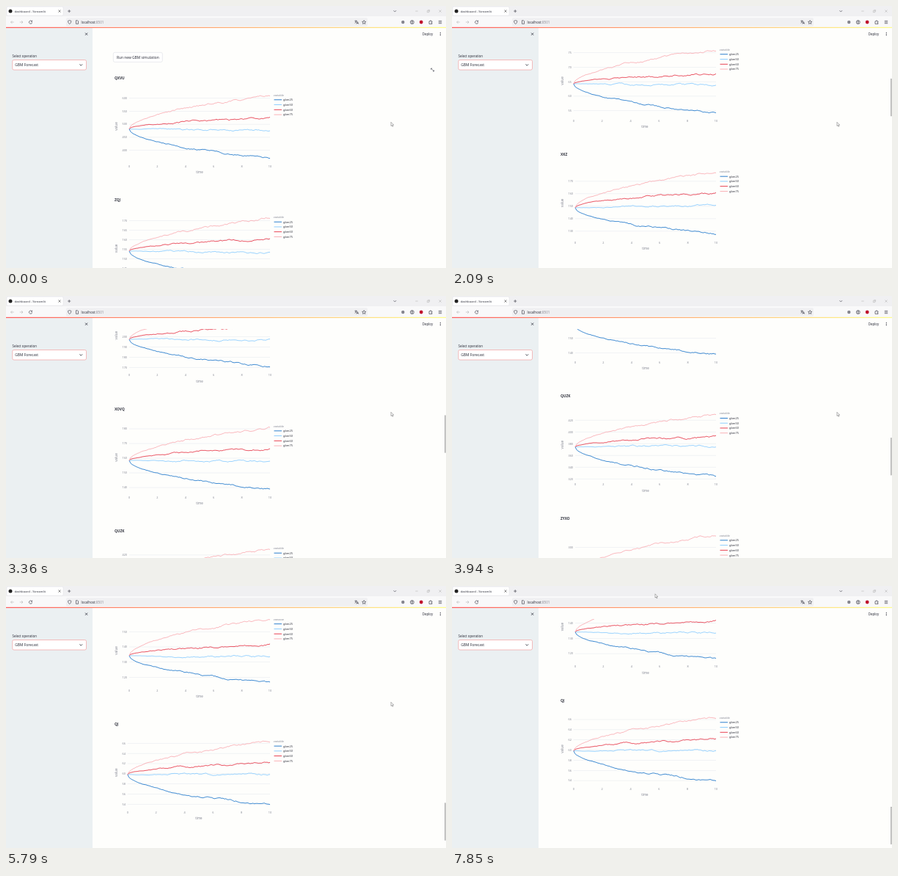
Recreate the animation shown at these times as an HTML page with a canvas. Size 600 px wide and 357 px high, loop 7.91 s.

```html
<!DOCTYPE html>
<html lang="en">
<head>
<meta charset="utf-8">
<title>dashboard</title>
<style>
html, body { margin: 0; width: 100%; height: 100%; overflow: hidden; background: #fff; }
canvas { display: block; width: 600px; height: 357px; }
</style>
</head>
<body>
<canvas id="stage"></canvas>
<script>
const W = 600, H = 357, LOOP = 7910;
const PITCH = 166.4, FIRST_TITLE = 98, PLOT_RIGHT = 360;
const FONT = '"Noto Sans", "Open Sans", sans-serif';
const INK = '#31333f', MUTED = '#858894';

// exponent: how quickly each quantile leaves the starting price
const SERIES = [
  { name: 'gbm25', color: '#1672c9', exponent: 0.51, noise: 0.8 },
  { name: 'gbm50', color: '#83c9ff', exponent: 1, noise: 0.85 },
  { name: 'gbm60', color: '#e62f42', exponent: 0.5, noise: 0.9 },
  { name: 'gbm75', color: '#f9a9b0', exponent: 0.54, noise: 1 },
];

// ticks: top value, value step, top y, y step, count; y values are relative to the title
const CHARTS = [
  { name: 'QXVU', ticks: [600, 50, 27.5, 17.8, 5], start: 69.5, ends: [109.5, 72, 53.5, 24.5] },
  { name: 'ZQJ', ticks: [170, 5, 28.3, 12.9, 7], start: 69.5, ends: [109.5, 71, 52.5, 25] },
  { name: 'VUQY', ticks: [75, 5, 27.7, 19.75, 5], start: 70, ends: [109.5, 72, 56.5, 25.5] },
  { name: 'XKZ', ticks: [170, 10, 36.5, 17, 5], start: 72.5, ends: [109, 69, 52, 25] },
  { name: 'ZEQO', ticks: [230, 10, 26, 13.95, 7], start: 71.5, ends: [109, 71, 54, 26.5] },
  { name: 'XOVQ', ticks: [180, 10, 27, 20, 5], start: 70, ends: [109, 71, 54, 25] },
  { name: 'QUZK', ticks: [420, 20, 32.5, 16, 6], start: 69, ends: [109, 69, 53.5, 25] },
  { name: 'ZYXO', ticks: [300, 50, 39.7, 28.7, 3], start: 74.5, ends: [109.4, 72.4, 57.4, 24] },
  { name: 'JXQ', ticks: [30, 1, 26.5, 13, 7], start: 69, ends: [108.5, 68, 51, 25] },
  { name: 'VEZX', ticks: [150, 10, 40.4, 20.7, 4], start: 73, ends: [109, 74.5, 57, 24] },
  { name: 'QJ', ticks: [66, 2, 26, 13.85, 7], start: 68.5, ends: [109.5, 68.5, 52, 24.5] },
];

const SCROLL = [[1000, 0], [1360, 185.4], [2790, 595.1], [3940, 959.4],
  [4790, 1258.7], [5790, 1573.5], [5950, 1606]];

const canvas = document.getElementById('stage');
const dpr = window.devicePixelRatio || 1;
canvas.width = W * dpr;
canvas.height = H * dpr;
const ctx = canvas.getContext('2d');
ctx.scale(dpr, dpr);

function random(seed) {
  return () => {
    seed = (seed * 1664525 + 1013904223) >>> 0;
    return seed / 4294967296;
  };
}

function quantilePath(left, start, end, { exponent, noise }, seed) {
  const next = random(seed), steps = 100, walk = [0];
  for (let i = 1; i <= steps; i++) walk.push(walk[i - 1] * 0.86 + (next() - 0.5) * 1.9);
  const path = new Path2D();
  for (let i = 0; i <= steps; i++) {
    const u = i / steps;
    const jitter = (walk[i] - walk[steps] * u) * noise * Math.min(1, 0.1 + u * 2.5);
    path.lineTo(left + (PLOT_RIGHT - left) * u, start + (end - start) * u ** exponent + jitter);
  }
  return path;
}

CHARTS.forEach((chart, c) => {
  chart.left = chart.ticks[0] < 100 ? 165.8 : 168;
  chart.paths = SERIES.map((s, i) =>
    quantilePath(chart.left, chart.start, chart.ends[i], s, 7919 * (c + 1) + 104729 * i));
});

function text(str, x, y, size, color = INK, align = 'left', weight = 400) {
  ctx.font = `${weight} ${size}px ${FONT}`;
  ctx.fillStyle = color;
  ctx.textAlign = align;
  ctx.textBaseline = 'alphabetic';
  ctx.fillText(str, x, y + size * 0.36);
}

function rect(x, y, w, h, color) {
  ctx.fillStyle = color;
  ctx.fillRect(x, y, w, h);
}

function box(x, y, w, h, radius, fill, stroke, width = 0.6) {
  ctx.beginPath();
  ctx.roundRect(x, y, w, h, radius);
  if (fill) { ctx.fillStyle = fill; ctx.fill(); }
  if (stroke) { ctx.strokeStyle = stroke; ctx.lineWidth = width; ctx.stroke(); }
}

function disc(x, y, r, color) {
  ctx.beginPath();
  ctx.arc(x, y, r, 0, 7);
  ctx.fillStyle = color;
  ctx.fill();
}

// Strokes an SVG path drawn around (x, y)
function icon(x, y, d, color = '#4a4a55', width = 0.7, fill) {
  const path = new Path2D(d);
  ctx.save();
  ctx.translate(x, y);
  if (fill) { ctx.fillStyle = fill; ctx.fill(path); }
  ctx.strokeStyle = color;
  ctx.lineWidth = width;
  ctx.stroke(path);
  ctx.restore();
}

const CROSS = 'M-1.6-1.6L1.6 1.6M1.6-1.6L-1.6 1.6';
const CHEVRON = 'M-1.8-.9L0 .9L1.8-.9';

function drawChart(chart, top) {
  const { left, ticks: [value, valueStep, tickY, tickStep, count] } = chart;
  ctx.save();
  ctx.translate(0, top);
  text(chart.name, 148, 0, 4.8, INK, 'left', 700);

  for (let i = 0; i < count; i++) {
    const y = tickY + i * tickStep;
    rect(left, y - 0.25, PLOT_RIGHT - left, 0.5, '#e2e6ec');
    text(value - i * valueStep, left - 3, y, 3.8, MUTED, 'right');
  }
  for (let i = 0; i <= 5; i++) {
    text(i * 2, left + (PLOT_RIGHT - left) * i / 5, 120.3, 3.8, MUTED, 'center');
  }
  text('time', (left + PLOT_RIGHT) / 2, 128.5, 4.4, MUTED, 'center');
  ctx.save();
  ctx.translate(150.3, 66);
  ctx.rotate(-Math.PI / 2);
  text('value', 0, 0, 4.6, MUTED, 'center');
  ctx.restore();

  ctx.lineWidth = 0.85;
  ctx.lineJoin = 'round';
  text('variable', 364.7, 23.3, 3.8, MUTED);
  SERIES.forEach(({ name, color }, i) => {
    const y = 29.8 + i * 6.75;
    ctx.strokeStyle = color;
    ctx.stroke(chart.paths[i]);
    rect(365.5, y - 0.45, 10.5, 0.9, color);
    text(name, 378, y, 3.9);
  });
  ctx.restore();
}

function drawPage(scroll) {
  rect(0, 0, W, H, '#fefefc');
  if (scroll < 90) {
    box(146.3, 63.3 - scroll, 67, 13, 2, '#fff', '#d5d7dc', 0.5);
    text('Run new GBM simulation', 179.8, 69.8 - scroll, 4.9, INK, 'center');
  }
  CHARTS.forEach((chart, i) => {
    const top = FIRST_TITLE + i * PITCH - scroll;
    if (top > -140 && top < H + 10) drawChart(chart, top);
  });
  if (scroll === 0) {
    icon(581.6, 87, 'M-2-.4V-2H-.4M-2-2L2 2M2 .4V2H.4', '#50525c', 0.7);
  } else {
    box(598.3, 33 + scroll / 6, 1.2, 51.5, 0.6, '#999');
  }

  rect(118, 29, 480, 16, '#fefefc');
  text('Deploy', 567.8, 38, 4.4);
  [-1.7, 0, 1.7].forEach(d => disc(592.3, 38 + d, 0.6, INK));
}

function drawSidebar() {
  rect(0, 29, 118, H - 29, '#ebf0f2');
  icon(109.6, 38.2, CROSS, INK, 0.8);
  text('Select operation', 8.5, 68, 4.4);
  box(8.8, 73.5, 100.7, 13.5, 2, '#fff', '#f28a8a', 0.55);
  text('GBM Forecast', 12.2, 80.3, 4.9);
  icon(102.3, 80.3, CHEVRON, INK, 0.9);
}

function drawBrowser() {
  rect(0, 0, W, 14, '#f0f0f2');
  rect(0, 14, W, 15.5, '#f9f9fa');
  box(1, 1, 77, 12, 1.5, '#fff', '#dcdce0', 0.4);
  disc(6, 7, 2.5, '#222');
  text('dashboard - Streamlit', 11.6, 7, 4.2);
  icon(73, 7, CROSS, '#444', 0.6);
  icon(86.2, 7, 'M-2 0H2M0-2V2');
  icon(530.3, 7, CHEVRON);
  icon(560, 7, 'M-1.7 0H1.7', '#aaa', 0.5);
  icon(576, 7, 'M-1.6-.7H.7V1.6H-1.6ZM-.7-1.6H1.6V.7', '#aaa', 0.5);
  icon(592, 7, CROSS, '#aaa', 0.5);

  icon(8.5, 22, 'M2.2 0H-2M-.2-1.8L-2 0L-.2 1.8', '#bbb');
  icon(21, 22, 'M-2.2 0H2M.2-1.8L2 0L.2 1.8', '#bbb');
  icon(33.5, 22, 'M1.6-1.3A2.1 2.1 0 1 0 2.1.4M2.1-2.4V-.8H.5');
  box(82, 16.3, 411, 11.2, 1.5, '#f0f0f2');
  icon(86.7, 22, 'M0-2.4L2.1-1.7C2.1 .5 1.4 1.7 0 2.5C-1.4 1.7-2.1 .5-2.1-1.7Z');
  icon(97, 22, 'M-1.5-2.3H.5L1.5-1.3V2.3H-1.5Z');
  text('localhost', 102.5, 22, 4.55);
  text(':8501', 121.8, 22, 4.55, '#8f8f98');
  icon(478, 22, 'M-2.5-1.7H.8M-.9-2.5V-1.7M.1-1.7C-.4-.2-1.2.7-2.4 1.2M-1.7-1.2L0 .8M0 2.5L1.4-.6L2.7 2.5M.5 1.5H2.2');
  icon(488.2, 22, 'M0-2.5L.8-.8L2.6-.6L1.2.6L1.6 2.4L0 1.5L-1.6 2.4L-1.2.6L-2.6-.6L-.8-.8Z');
  disc(541.3, 22, 2.2, '#85858e');
  icon(553.8, 22, 'M2.5 0A2.5 2.5 0 1 1-2.5 0A2.5 2.5 0 1 1 2.5 0M-1.5 1.8Q0 .1 1.5 1.8M.9-.7A.9.9 0 1 1-.9-.7A.9.9 0 1 1 .9-.7');
  disc(566.2, 22, 2.4, '#c0142e');
  icon(579, 22, 'M-2-1.2H-.7C-1-2.8 1-2.8.7-1.2H2V.2C.5 0 .5 1.6 2 1.3V2.4H-2Z');
  icon(592, 22, 'M-2.2-1.7H2.2M-2.2 0H2.2M-2.2 1.7H2.2');

  const bar = ctx.createLinearGradient(0, 0, W, 0);
  bar.addColorStop(0, '#ff4b4b');
  bar.addColorStop(1, '#fffd80');
  rect(0, 28.8, W, 1.1, bar);
}

function drawCursor(t) {
  const u = Math.min(1, Math.max(0, (t - 6850) / 790));
  const e = u * u * (3 - 2 * u);
  icon(525 - 248 * e, 158.3 - 147.5 * e,
    'M0 0V5.2L1.2 4.1L2 6L2.9 5.6L2.1 3.8H3.7Z', '#555', 0.45, '#fff');
}

function scrollAt(t) {
  if (t <= SCROLL[0][0]) return 0;
  const i = SCROLL.findIndex(([time]) => time > t);
  if (i < 0) return SCROLL[SCROLL.length - 1][1];
  const [t0, y0] = SCROLL[i - 1], [t1, y1] = SCROLL[i];
  return y0 + (y1 - y0) * (t - t0) / (t1 - t0);
}

const startTime = performance.now();
function frame() {
  const t = (performance.now() - startTime) % LOOP;
  drawPage(scrollAt(t));
  drawSidebar();
  drawBrowser();
  drawCursor(t);
  requestAnimationFrame(frame);
}
frame();
</script>
</body>
</html>
```
